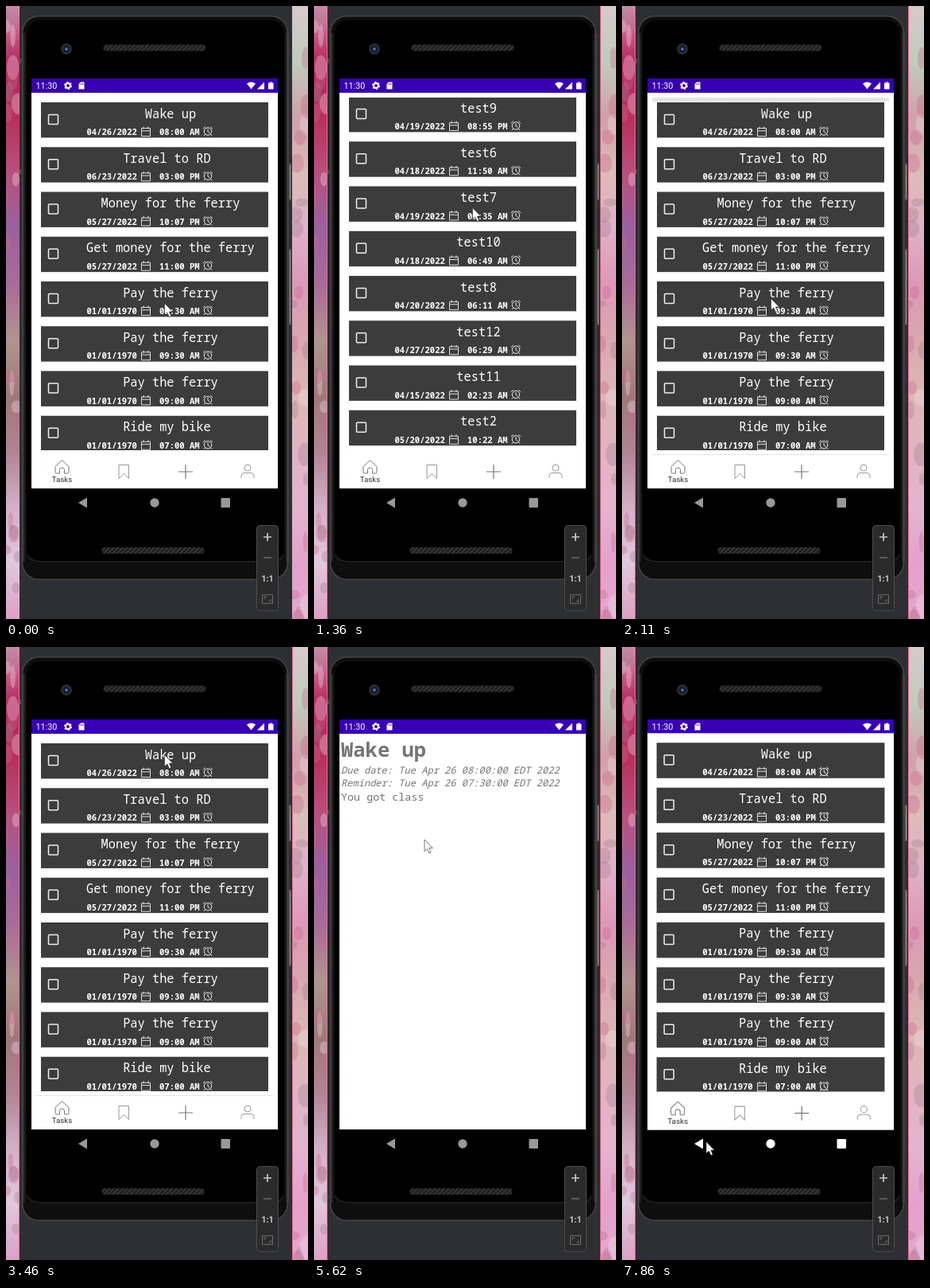
An HTML page for the animation above (8 s loop, 380 by 770 pixels).

```html
<!DOCTYPE html>
<html lang="en">
<head>
<meta charset="utf-8">
<title>Task list on a phone</title>
<style>
html, body { margin: 0; width: 100%; height: 100%; overflow: hidden; background: #2d2f33; }
svg { display: block; width: 100%; height: 100%; }
text { white-space: pre; }
.mono { font-family: "Noto Sans Mono", "DejaVu Sans Mono", monospace; }
.ui { font-family: Roboto, "Open Sans", sans-serif; }
.title { font-size: 15.35px; font-weight: 500; fill: #fff; }
.when { font-size: 10.55px; font-weight: 600; fill: #fff; }
.line { fill: none; stroke-linejoin: round; }
</style>
</head>
<body>
<svg viewBox="0 0 380 770">
  <defs>
    <linearGradient id="artLeft" x2="0" y2="1"></linearGradient>
    <linearGradient id="artRight" x2="0" y2="1"></linearGradient>
    <linearGradient id="edge">
      <stop stop-color="#444"/><stop offset=".5" stop-color="#1c1c1c"/><stop offset="1" stop-color="#000"/>
    </linearGradient>
    <pattern id="mesh" width="4" height="4" patternUnits="userSpaceOnUse" patternTransform="rotate(45)">
      <rect width="4" height="4" fill="#1c1c1c"/><rect width="2" height="4" fill="#363636"/>
    </pattern>
    <clipPath id="display"><rect x="32" y="91" width="310" height="551"/></clipPath>
    <clipPath id="viewport"><rect x="38" y="115" width="298" height="443"/></clipPath>
    <g id="calendar" class="line" stroke="#ddd">
      <path d="M-5.5-4.5h11v10h-11zM-5.5-1.2h11M-3-6.5v3M3-6.5v3"/>
    </g>
    <g id="alarm" class="line" stroke="#eee">
      <circle r="4.7"/><path d="M0-3V.3L2.3 2M-6-3.2-3.2-5.8M6-3.2 3.2-5.8M-3.4 3.6-5 5.5M3.4 3.6 5 5.5"/>
    </g>
  </defs>

  <g id="art">
    <rect width="17" height="770" fill="url(#artLeft)"/>
    <rect x="360" width="20" height="770" fill="url(#artRight)"/>
    <g id="petals"></g>
    <rect x="17" width="343" height="770" fill="#2d2f33"/>
    <path id="frameLines" d="M16.5 0V770M360.5 0V770" stroke="#e8688f"/>
  </g>

  <g id="phone">
    <path d="M356 198h3v46h-3zM356 305h3v96h-3z" fill="#555"/>
    <path d="M357.5 200v42M357.5 307v92" stroke="#8a8a8a"/>
    <path d="M17 66h4v6h-4zM17 205h4v6h-4z" fill="#4c4c4c"/>
    <rect x="19.5" y="11.5" width="336" height="710" rx="22" fill="#0e0e0e"/>
    <rect x="20" y="34" width="7" height="664" fill="url(#edge)"/>
    <rect x="-356" y="34" width="7" height="664" fill="url(#edge)" transform="scale(-1 1)"/>
    <rect x="20.5" y="12.5" width="334" height="708" rx="21" class="line" stroke="#424242" stroke-width="2"/>
    <rect x="26" y="18" width="324" height="679" rx="17" fill="#000"/>
    <path d="M26 690Q30 698 46 698H331Q346 698 350 690" class="line" stroke="#2c2c2c"/>
    <rect x="122.5" y="48.5" width="129" height="8" rx="4" fill="url(#mesh)"/>
    <rect x="120.5" y="680" width="129" height="8" rx="4" fill="url(#mesh)"/>
    <circle cx="76" cy="54" r="7" fill="#2a2c30"/>
    <circle cx="76" cy="54" r="4" fill="#101a35"/>
    <circle cx="76" cy="54" r="1.8" fill="#5878b8"/>
  </g>

  <g clip-path="url(#display)">
    <g id="listWindow">
      <rect x="32" y="91" width="310" height="551"/>
      <rect x="32" y="91" width="310" height="18" fill="#3700b3"/>
      <rect x="32" y="109" width="310" height="497" fill="#fff"/>
      <g clip-path="url(#viewport)">
        <g id="rows"></g>
        <path id="glowTop" fill="#777"/>
        <path id="glowBottom" fill="#777"/>
      </g>
      <path id="divider" d="M38 563.5H336" stroke="#e4e4e4"/>
      <g class="line" stroke="#999">
        <path d="M62 578.5 70.5 570.5 79 578.5V585.5Q79 587 77.5 587H73.5V582.5Q73.5 580 70.500 580T67.5 582.5V587H63.5Q62 587 62 585.5Z" stroke="#777"/>
        <path d="M142 576.5H154.5V593.5L148.2 587.5 142 593.5Z"/>
        <path d="M226 576V594M217 585H235" stroke="#777" stroke-width="1.2"/>
        <circle cx="304" cy="580" r="4"/>
        <path d="M296 593V590.5Q296 586.5 300 586.5H308Q312 586.5 312 590.5V593"/>
      </g>
      <text x="70.5" y="598" class="ui" font-size="9.8" text-anchor="middle" fill="#333">Tasks</text>
    </g>
    <g id="detailWindow">
      <rect x="32" y="91" width="310" height="551"/>
      <rect x="32" y="91" width="310" height="18" fill="#3700b3"/>
      <rect x="32" y="109" width="310" height="497" fill="#fff"/>
      <g class="mono" fill="#757575">
        <text x="34" y="138" font-size="25.5" font-weight="600">Wake up</text>
        <g font-size="12.05" font-style="italic">
          <text x="34" y="158.5">Due date: Tue Apr 26 08:00:00 EDT 2022</text>
          <text x="34" y="174.5">Reminder: Tue Apr 26 07:30:00 EDT 2022</text>
        </g>
        <text x="34" y="192.5" font-size="13.4">You got class</text>
      </g>
    </g>
    <g fill="#fff">
      <text x="37.5" y="104" class="ui" font-size="10.8">11:30</text>
      <circle cx="78" cy="100" r="2.9" class="line" stroke="#fff" stroke-width="2"/>
      <circle cx="78" cy="100" r="4.3" class="line" stroke="#fff" stroke-width="1.5" stroke-dasharray="2.25"/>
      <path d="M94 95.5H98.5V104.5H91.5V98Z"/>
      <path d="M93.8 97v2M95.5 97v2M97.2 97v2" stroke="#3700b3" stroke-width=".7"/>
      <path d="M303 97.5Q308.5 93.5 314 97.5L308.5 104.5Z"/>
      <path d="M325 95.5V104.5H316Z"/>
      <path d="M330 96.5H332V95.5H334.5V96.5H336.5V104.5H330Z"/>
    </g>
    <rect id="ripple" x="75.5" y="606" width="44" height="36" rx="18" fill="#fff"/>
    <g id="navIcons">
      <path d="M102 617.5V630.5L91 624Z"/>
      <circle cx="187" cy="624" r="5.7"/>
      <rect x="270.5" y="618" width="11.5" height="12" rx="1"/>
    </g>
  </g>

  <g id="toolbar">
    <rect x="315.5" y="652.5" width="27" height="107" rx="4" fill="#2b2b2b" stroke="#4a4c4f"/>
    <path d="M324 667H334M329 662V672" stroke="#c8c8c8" stroke-width="1.7"/>
    <path d="M324 693H334" stroke="#6a6a6a" stroke-width="1.5"/>
    <text x="329" y="723" class="ui" font-size="11" font-weight="700" text-anchor="middle" fill="#c8c8c8">1:1</text>
    <g class="line" stroke="#6a6a6a">
      <rect x="322.5" y="739.5" width="13" height="11"/>
      <path d="M325 745V742H328M333 745V748H330"/>
    </g>
  </g>

  <path id="cursor" d="M0 0V14.5L3.4 11.5 5.8 17 8.2 16 5.9 10.6H10.3Z" fill="#fff" stroke="#222" stroke-width=".6"/>
</svg>
<script>
const LOOP = 8000, PITCH = 56.25, TITLE_ADVANCE = 9.21;
const el = id => document.getElementById(id);
const set = (id, name, value) => el(id).setAttribute(name, value);

// Trailing spaces count when a title is centred
const tasks = `Wake up|04/26/2022|08:00 AM
Travel to RD |06/23/2022|03:00 PM
Money for the ferry|05/27/2022|10:07 PM
Get money for the ferry|05/27/2022|11:00 PM
Pay the ferry|01/01/1970|09:30 AM
Pay the ferry|01/01/1970|09:30 AM
Pay the ferry|01/01/1970|09:00 AM
Ride my bike |01/01/1970|07:00 AM
test9|04/19/2022|08:55 PM
test6|04/18/2022|11:50 AM
test7|04/19/2022|09:35 AM
test10|04/18/2022|06:49 AM
test8|04/20/2022|06:11 AM
test12|04/27/2022|06:29 AM
test11|04/15/2022|02:23 AM
test2|05/20/2022|10:22 AM`.split('\n').map(line => line.split('|'));

const MAX_SCROLL = tasks.length * PITCH - 443;

el('rows').innerHTML = tasks.map(([title, date, time], i) => `
  <g class="mono" transform="translate(0 ${121 + i * PITCH})">
    <rect x="44" width="286" height="44.4" fill="#3c3c3c"/>
    <rect x="53.5" y="15.5" width="12" height="12" rx="1" class="line" stroke="#eee" stroke-width="1.5"/>
    <text x="${207 - title.length * TITLE_ADVANCE / 2}" y="19.5" class="title">${title}</text>
    <text x="101.5" y="41" class="when">${date}</text>
    <text x="193" y="41" class="when">${time}</text>
    <use href="#calendar" x="176" y="37"/><use href="#alarm" x="254" y="36.5"/>
  </g>`).join('');

// Soft colour washes with scattered petals on both sides of the emulator
function wash(id, colors) {
  el(id).innerHTML = colors.split(' ').map((color, i, all) =>
    `<stop offset="${i / (all.length - 1)}" stop-color="#${color}"/>`).join('');
}
wash('artLeft', 'd890b0 b42860 b8305c b8507c 9a60a0 a86c98 b09490 a07878 b08494 d4b0c8 e0c8dc dca0c4');
wash('artRight', 'd8c8cc c0ccbc d0a0a8 dcbcb8 e0b0c8 dc98b8 d8a8b0 dcb8b4 e0b4c4 e4b4d0 e4a0cc e4a8d0');

function seeded(seed) {
  return () => (seed = seed * 16807 % 2147483647) / 2147483647;
}
const random = seeded(11);
el('petals').innerHTML = Array.from({ length: 44 }, (_, i) => {
  const x = i % 2 ? 360 + random() * 20 : random() * 17;
  const color = ['#f4dce8', '#c8688c', '#a08090'][Math.floor(random() * 3)];
  return `<ellipse cx="${x}" cy="${random() * 770}" rx="${3 + random() * 6}" ry="${5 + random() * 12}" fill="${color}" opacity=".35"/>`;
}).join('');

// Fraction of a move that advances in even jumps, the first at start, the last at end
function progress(t, start, end, steps) {
  if (t < start) return 0;
  const jump = Math.floor((t - start) / (end - start || 1) * (steps - 1) + 1e-6) + 1;
  return Math.min(1, jump / steps);
}
const easeOut = (p, power) => 1 - (1 - p) ** power;
const smooth = p => p * p * (3 - 2 * p);

const pointerStart = [199.5, 373.5];
const pointerMoves = [
  { start: 300, end: 300, steps: 1, to: [207, 181] },
  { start: 570, end: 960, steps: 4, to: [199.5, 248] },
  { start: 1360, end: 1360, steps: 1, to: [199.5, 253.5] },
  { start: 1510, end: 1810, steps: 3, to: [187.5, 367.5] },
  { start: 2270, end: 2390, steps: 2, to: [205, 196] },
  { start: 2650, end: 2920, steps: 3, to: [199.5, 115] },
  { start: 3070, end: 3460, steps: 4, to: [199.5, 135.5] },
  { start: 5500, end: 5620, steps: 2, to: [139, 242] },
  { start: 5770, end: 6380, steps: 6, to: [97, 606] },
  { start: 6500, end: 6800, steps: 3, to: [106, 621.5] }
];

function pointerAt(t) {
  return pointerMoves.reduce((from, { start, end, steps, to }) => {
    const p = progress(t, start, end, steps);
    return from.map((v, axis) => v + (to[axis] - v) * p);
  }, pointerStart);
}

function scaleWindow(id, s) {
  set(id, 'transform', `translate(187 366) scale(${s}) translate(-187 -366)`);
}

// Overscroll arc that shrinks back to its edge
function glow(id, edge, direction, size, fade) {
  const visible = fade > 0 && fade <= 1;
  const depth = direction * size * fade * fade;
  set(id, 'd', `M38 ${edge}H336V${edge + depth}Q187 ${edge + depth * 1.4} 38 ${edge + depth}Z`);
  set(id, 'opacity', visible ? .2 : 0);
}

function drawWindows(t) {
  const open = progress(t, 4890, 5250, 4);
  const close = progress(t, 7710, 8010, 3);
  const closed = easeOut(close, 3), opened = easeOut(open, 1.7);
  scaleWindow('listWindow', close ? 1 + .08 * (1 - closed) : 1 + .05 * opened);
  scaleWindow('detailWindow', close ? 1 - .1 * closed : .85 + .15 * opened);
  set('detailWindow', 'opacity', close ? Math.max(0, 1 - close * 1.5) : Math.min(1, open * 4 / 3));
  set('navIcons', 'fill', close ? '#fff' : '#999');
}

function draw(t) {
  set('cursor', 'transform', `translate(${pointerAt(t).join(' ')})`);

  const down = easeOut(progress(t, 450, 810, 4), 2);
  const back = smooth(progress(t, 1510, 1810, 3));
  set('rows', 'transform', `translate(0 ${(back - down) * MAX_SCROLL})`);
  glow('glowBottom', 558, -1, 14, 1 - (t - 810) / 300);
  glow('glowTop', 115, 1, 40, 1 - (t - 1810) / 460);

  drawWindows(t);
  set('divider', 'opacity', t >= 2110 && t < 4890 ? 1 : 0);
  set('frameLines', 'opacity', t >= 150 ? 1 : 0);
  set('ripple', 'opacity', t >= 7230 ? .13 * (1 - progress(t, 7350, 7710, 4)) : 0);
}

const start = performance.now();
function tick() {
  draw((performance.now() - start) % LOOP);
  requestAnimationFrame(tick);
}
tick();
</script>
</body>
</html>
```
